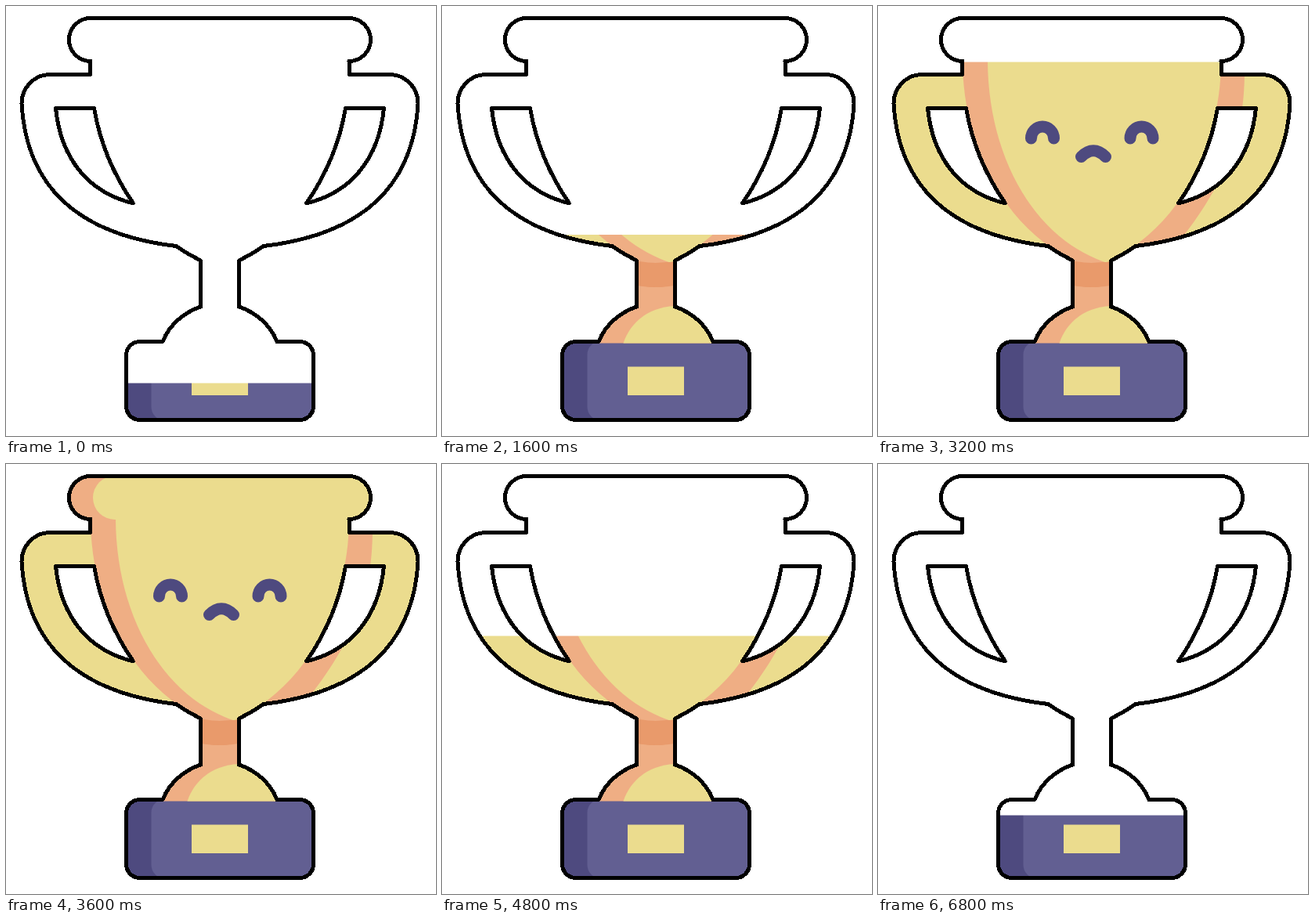
An HTML page that plays this animation: 549 px wide and 549 px high, repeating every 7200 ms.

```html
<!DOCTYPE html>
<html lang="en">
<head>
<meta charset="utf-8">
<title>Filling trophy</title>
<style>
  html, body { margin: 0; width: 100%; height: 100%; overflow: hidden; background: #fff; }
  svg { display: block; width: 100vw; height: 100vh; }
  .gold { fill: #ebdc8e; }
  .shade { fill: #efae84; }
  .deep { fill: #e99a6b; }
  .navy { fill: #4e4a7f; }
  .violet { fill: #625f92; }
  .face { fill: none; stroke: #4e4a7f; stroke-width: 15; stroke-linecap: round; }
  .line { fill: none; stroke: #000; stroke-width: 5; stroke-linejoin: round; shape-rendering: crispEdges; }

  /* The white cover hides everything above the fill level. */
  .cover { fill: #fff; animation: level 7200ms step-end infinite; }
  @keyframes level {
    0%, 100% { transform: translateY(481.5px); }
    5.555%, 94.444% { transform: translateY(448.5px); }
    11.111%, 88.888% { transform: translateY(389.5px); }
    16.666%, 83.333% { transform: translateY(340.5px); }
    22.222%, 77.777% { transform: translateY(292px); }
    27.777%, 72.222% { transform: translateY(242.5px); }
    33.333%, 66.666% { transform: translateY(219.5px); }
    38.888%, 61.111% { transform: translateY(144.5px); }
    44.444%, 55.555% { transform: translateY(71.5px); }
    50% { transform: translateY(0); }
  }
</style>
</head>
<body>
<svg viewBox="0 0 549 549">
  <defs>
    <path id="outline" clip-rule="evenodd" d="
      M108 15.5 H438 A27.5 27.5 0 0 1 438 70.5 H438.5 V87.5 H490
      A36 37 0 0 1 526 125 C520 228 457 291.5 329 306.5
      Q314 317 297.5 325 V384 C318 391 337 406 346 428.5
      H375 A17.5 17.5 0 0 1 392.5 446 V511 A17.5 17.5 0 0 1 375 528.5
      H171 A17.5 17.5 0 0 1 153.5 511 V446 A17.5 17.5 0 0 1 171 428.5
      H200 C209 406 228 391 248.5 384 V325
      Q232 317 217 306.5 C89 291.5 26 228 20 125
      A36 37 0 0 1 56 87.5 H107.5 V70.5 H108 A27.5 27.5 0 0 1 108 15.5 Z
      M63.5 130.5 H112.5 C120 175 137 215 162.5 252 C105 238 70 195 63.5 130.5 Z
      M482.5 130.5 H433.5 C426 175 409 215 383.5 252 C441 238 476 195 482.5 130.5 Z"/>
    <clipPath id="inside"><use href="#outline"/></clipPath>
  </defs>

  <g clip-path="url(#inside)">
    <!-- handles -->
    <rect class="gold" y="80" width="549" height="240"/>
    <path class="shade" d="M400 80 H468 V88 C467 155 452 215 385 300 L370 320 H300 Z"/>

    <!-- stem -->
    <rect class="shade" x="190" y="310" width="166" height="120"/>
    <path class="deep" d="M240 320 H306 V355 Q273 363 240 355 Z"/>

    <!-- base -->
    <rect class="navy" x="153" y="428" width="240" height="101"/>
    <rect class="violet" x="185.5" y="428" width="220" height="101" rx="17"/>
    <rect class="gold" x="237" y="460.5" width="72" height="36.5"/>

    <!-- foot -->
    <path class="shade" d="M200 430.5 V380 H346 V430.5 Z"/>
    <path class="gold" d="M231.5 430.5 C240 405 262 385 297 383 L346 395 V430.5 Z"/>
    <path class="deep" d="M248 340 H298 V355 Q273 363 248 355 Z"/>

    <!-- bowl -->
    <path class="shade" d="M108 71 H438 C438 150 405 270 297 325 Q273 331 248 325 C141 270 108 150 108 71 Z"/>
    <path class="gold" d="M140 71 H438 C438 150 405 270 297 325 Q293 328 288 326.5 C197 294 141 190 140 71 Z"/>

    <!-- rim -->
    <rect class="shade" x="80" y="15" width="386" height="56" rx="28"/>
    <rect class="gold" x="111" y="15" width="355" height="56" rx="28"/>

    <!-- face -->
    <path class="face" d="M195.5 169 a14.5 15 0 0 1 29 0 M322 169 a14.5 15 0 0 1 29 0 M259.5 192.5 q15.5 -15.5 31 0"/>

    <rect class="cover" y="-549" width="549" height="549"/>
  </g>
  <use class="line" href="#outline"/>
</svg>
</body>
</html>
```
